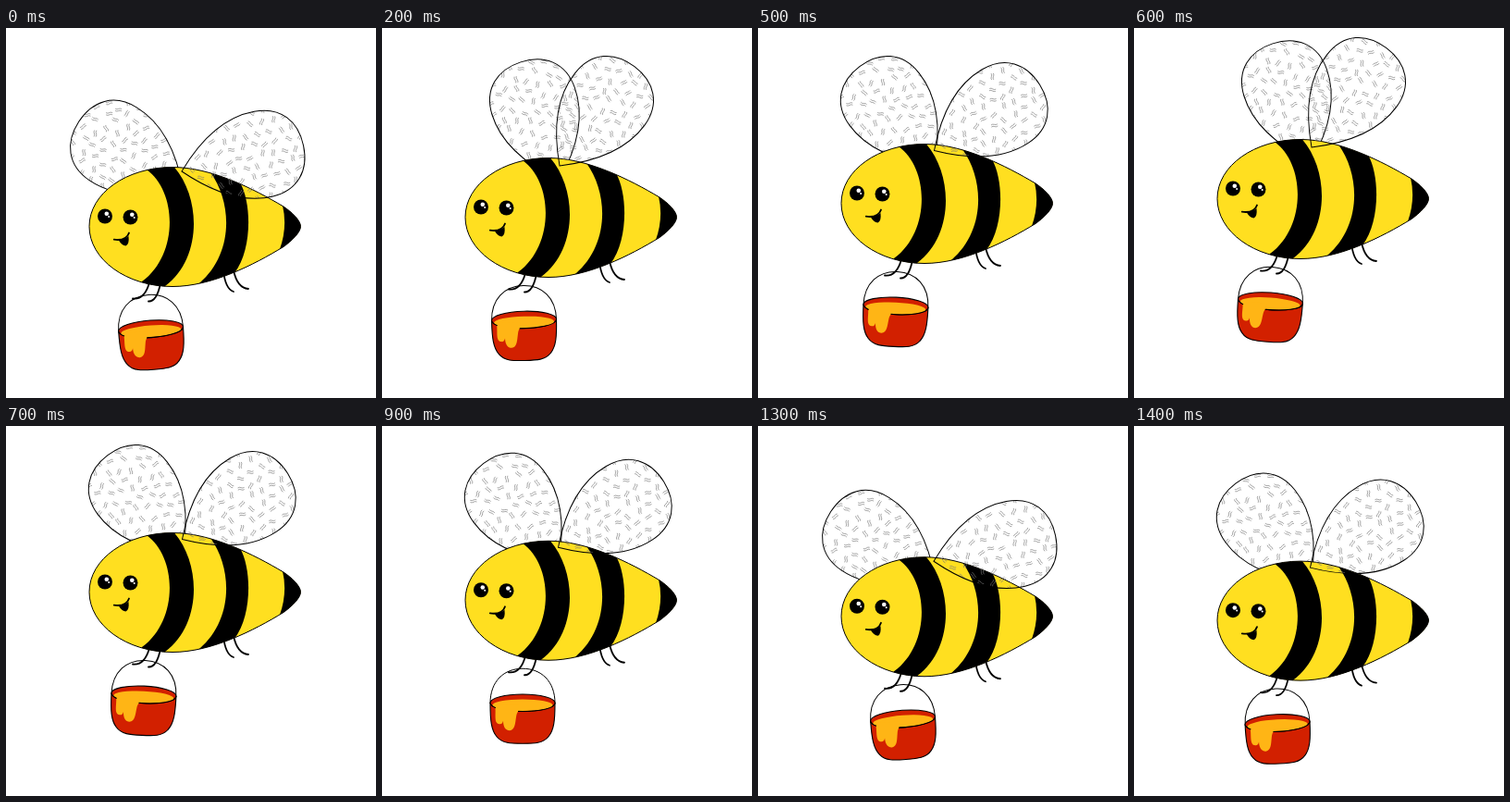
These frames come from a looping animation (400x400 px, 1.5 s). An HTML page:

```html
<!DOCTYPE html>
<html lang="en">
<head>
<meta charset="utf-8">
<title>Bee with a honey pot</title>
<style>
  html, body { margin: 0; width: 100%; height: 100%; overflow: hidden; background: #fff; }
  svg { display: block; width: 100vw; height: 100vh; }
  .line { fill: none; stroke: #000; stroke-width: 1; }
  .limb { fill: none; stroke: #000; stroke-width: 1.8; stroke-linecap: round; }
  .hatch { fill: none; stroke: #777; stroke-width: .6; }
</style>
</head>
<body>
<svg viewBox="0 0 400 400">
  <defs>
    <path id="wingShape" d="M0 0C25 -27 55 -48 90 -47C119 -46.5 134.500 -27 134.500 0C134.500 27 119 46.500 90 47C55 47.500 25 26 0 0Z"/>
    <path id="bodyShape" d="M90 214.500C90 179 130 150.500 180 150.500C222 150.500 268 174 300 193C309 199 318.500 208 318.500 214.500C318.500 221 309 230 300 236.500C268 256 222 279.500 180 279.500C130 279.500 90 250 90 214.500Z"/>
    <clipPath id="wingClip"><use href="#wingShape"/></clipPath>
    <clipPath id="bodyClip"><use href="#bodyShape"/></clipPath>
    <g id="eye">
      <circle r="8"/>
      <circle cx="1.800" cy="-2.700" r="2.300" fill="#fff"/>
      <circle cx="4.200" cy=".4" r="1" fill="#fff"/>
    </g>
  </defs>
  <g id="bee">
    <g id="left">
      <path class="hatch" clip-path="url(#wingClip)"/>
      <use href="#wingShape" class="line"/>
    </g>

    <g id="pot">
      <path class="line" d="M117 326C117 302 132 288.500 152 288.500S187 302 187 326"/>
      <g stroke="#000" stroke-width="1.100" fill="#d22000">
        <path d="M117 326C117 344 118 355 124 362C130 369.500 139 369.500 152 369.500S174 369.500 180 362C186 355 187 344 187 326Z"/>
        <ellipse cx="152" cy="325.500" rx="35" ry="9.300"/>
      </g>
      <ellipse cx="152" cy="328" rx="32.500" ry="6.300" fill="#ffb515"/>
      <path fill="#ffb515" d="M122 328C124 336 120 348 127 348.500Q130 349 131 345C131 352 134 355.500 138 355.500C144 355 144 347 145 341Q145.500 336 148 334L148 328Z"/>
      <path class="line" d="M117 326Q118 329 123 331M147 334.700C166 335.500 187 332 187 326"/>
    </g>

    <path class="limb" d="M155 275Q150 294 137 292.500M167 276Q163 296 154 295.500M235 262Q237 282 246 285M246 262Q250 281 262 282"/>

    <use href="#bodyShape" fill="#ffdf20"/>
    <g clip-path="url(#bodyClip)">
      <path d="M148 147L152 153C186 178 186 246 147 274L143 284H170L172 279C211.500 250 211.500 185 182 150.500L180 145Z"/>
      <path d="M218 148L221 156C245.500 190 245.500 245 209 276L206 284H246L247 265C266 240 266 190 253 167L251 155Z"/>
      <path d="M296 185L299 192Q304.500 215 296 239V245H325V185Z"/>
    </g>
    <use href="#bodyShape" class="line"/>

    <use href="#eye" x="107" y="203.500"/>
    <use href="#eye" x="134.500" y="204.500"/>
    <path class="limb" d="M116.800 228.700Q130 230.500 133 221.500"/>
    <path d="M121.500 229Q125.500 235.500 129.500 235.500Q133.500 234 132.500 225Q128 229 121.500 229Z"/>

    <g id="right">
      <path class="hatch" clip-path="url(#wingClip)"/>
      <use href="#wingShape" class="line"/>
    </g>
  </g>
</svg>
<script>
const STEP = 100, STEPS = 15, CYCLE = 13, PEAK = 7, LIFT = 35, SWING = 4.2;
// Wing poses: tip x, tip y, angle; open, half, closed
const POSES = {
  left: [[191.5, 174.5, 33], [190.8, 174, 53], [191.5, 174.8, 72]],
  right: [[190, 155, -12], [190.5, 157.5, -32], [192, 159, -53]]
};
const $ = id => document.getElementById(id);
const place = (id, value) => $(id).setAttribute('transform', value);

function seeded(seed) {
  return () => (seed = seed * 16807 % 2147483647) / 2147483647;
}

// Pairs of short wavy strokes on a loose grid
function hatch(seed) {
  const rnd = seeded(seed), gap = 12.6;
  let d = '';
  for (let row = -4; row <= 4; row++) {
    for (let col = 0; col < 12; col++) {
      const x = (col + (row & 1) / 2) * gap + rnd() * 4 - 2;
      const y = row * gap * .92 + rnd() * 4 - 2;
      const a = rnd() * Math.PI, c = Math.cos(a), s = Math.sin(a);
      const at = (u, v) => `${(x + u * c - v * s).toFixed(1)} ${(y + u * s + v * c).toFixed(1)}`;
      for (const v of [-1.1, 1.1])
        d += `M${at(-3.5, v)}Q${at(-1.7, v - 1)} ${at(0, v)}T${at(3.5, v)}`;
    }
  }
  return d;
}

function draw(now) {
  const n = Math.floor(now / STEP) % STEPS;
  const k = n % CYCLE;
  const flap = 2 - Math.abs(2 - k % 4);
  const y = n <= PEAK ? -LIFT * n / PEAK : -LIFT * (STEPS - n) / (STEPS - PEAK);
  const swing = SWING * (1 - Math.abs(k - 6) / 3);
  place('bee', `translate(0 ${y})`);
  place('pot', `rotate(${swing} 152 263)`);
  for (const side in POSES) {
    const [tx, ty, a] = POSES[side][flap];
    const flip = side === 'left' ? ' scale(-1 1)' : '';
    place(side, `translate(${tx} ${ty}) rotate(${a})${flip}`);
  }
}

document.querySelectorAll('.hatch').forEach((p, i) => p.setAttribute('d', hatch(41 + i * 977)));
const start = performance.now();
function tick() {
  draw(performance.now() - start);
  requestAnimationFrame(tick);
}
tick();
</script>
</body>
</html>
```
